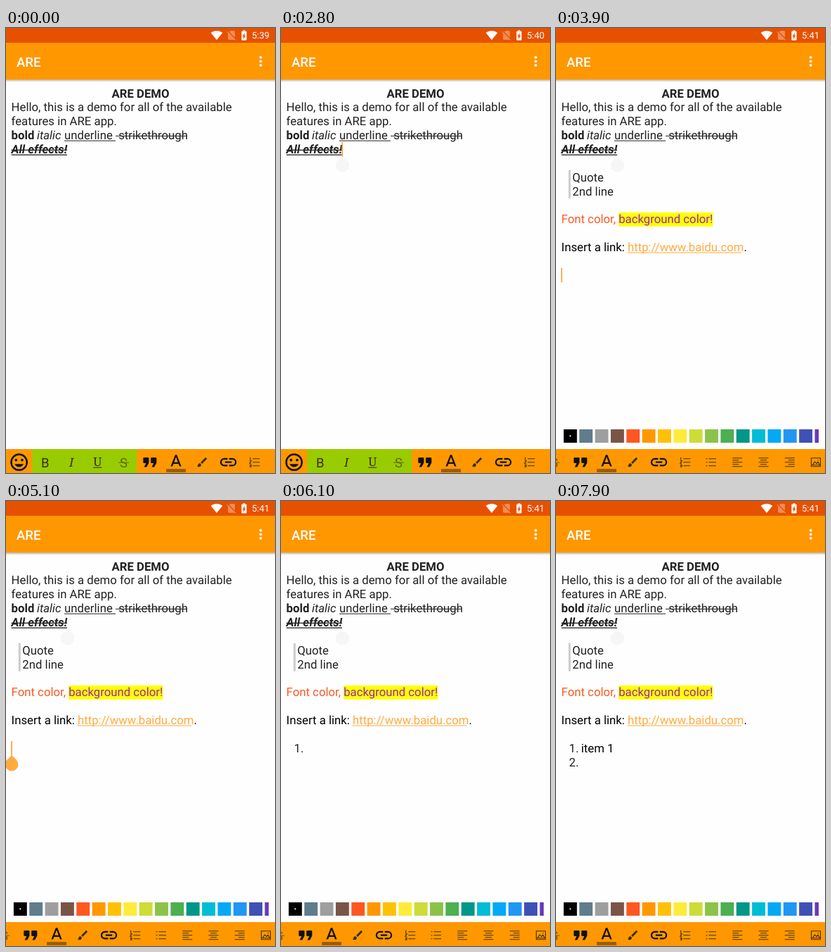
Animation, 383 px wide and 632 px high, one loop 8000 ms. Source, as an HTML page:

```html
<!DOCTYPE html>
<html lang="en">
<head>
<meta charset="utf-8">
<title>Rich text editor demo</title>
<style>
html, body { margin: 0; width: 100%; height: 100%; overflow: hidden; background: #fefefe; }
svg { display: block; width: 383px; height: 632px; }
text { font: 16.76px Roboto, sans-serif; fill: #212121; white-space: pre; text-rendering: geometricPrecision; }
.bold { font-weight: 700; }
.italic { font-style: italic; }
.black { fill: #000; }
.link { fill: #ffab40; }
.title { font-size: 18.6px; font-weight: 500; fill: #fff; }
.clock { font-size: 13px; fill: #fff; }
.icon-text { font-size: 18.5px; fill: #3a2c12; text-anchor: middle; }
.serif { font-family: "Noto Serif", serif; font-size: 17px; }
.thin { fill: none; stroke: #40300f; stroke-width: 1.1; }
</style>
</head>
<body>
<svg viewBox="0 0 383 632">
  <defs>
    <linearGradient id="shade" x2="0" y2="1">
      <stop stop-color="#000" stop-opacity=".28"/>
      <stop offset="1" stop-color="#000" stop-opacity="0"/>
    </linearGradient>
    <clipPath id="paletteClip"><rect x="9" y="565" width="365" height="30"/></clipPath>
    <path id="drop" d="M0-13.1L6.6-6.6A9.3 9.3 0 1 1-6.6-6.6Z" fill="#ffab40"/>
  </defs>
  <rect width="383" height="632" fill="#fefefe"/>

  <rect y="73" width="383" height="4" fill="url(#shade)"/>
  <rect y="20" width="383" height="53.3" fill="#ff9800"/>
  <rect width="383" height="21" fill="#e65100"/>
  <g fill="#fff">
    <path transform="translate(291.6 2) scale(.7)" d="M12 21.5L23.64 7C23.2 6.66 18.7 3 12 3S.8 6.66.36 7Z"/>
    <path transform="translate(312.6 2) scale(.7)" opacity=".35" d="M19 5c0-1.1-.9-2-2-2h-7L7.66 5.34 19 16.68ZM3.65 3.88L2.38 5.15 5 7.77V19c0 1.1.9 2 2 2h10c.35 0 .67-.1.96-.26l1.88 1.88 1.27-1.27Z"/>
    <path transform="translate(330.3 1.7) scale(.72)" d="M15.67 4H14V2h-4v2H8.33C7.6 4 7 4.6 7 5.33v15.33C7 21.4 7.6 22 8.33 22h7.33c.74 0 1.34-.6 1.34-1.33V5.33C17 4.6 16.4 4 15.67 4ZM11 20v-5.5H9L13 7v5.5h2Z"/>
    <circle cx="362.6" cy="41.7" r="1.9"/>
    <circle cx="362.6" cy="47.3" r="1.9"/>
    <circle cx="362.6" cy="52.9" r="1.9"/>
  </g>
  <text id="clock" class="clock" x="350" y="15.2"></text>
  <text class="title" x="15" y="54.6">ARE</text>

  <g id="page"></g>
  <g id="quoteBlock"></g>
  <g id="linkBlock"></g>
  <g id="list"></g>
  <circle id="ghost" cx="87.5" cy="195" r="9.8" fill="#f6f6f6"/>
  <use id="handle" href="#drop"/>
  <rect id="cursor" width="1.7" height="20.2" fill="#ffa330"/>

  <g clip-path="url(#paletteClip)"><g id="palette"></g></g>

  <rect y="598" width="383" height="34" fill="#ff9800"/>
  <g id="tools">
    <rect id="active" y="598" height="34" fill="#9c0"/>
    <g id="icons"></g>
  </g>
</svg>
<script>
const LOOP = 8000, LINE = 19.86, LEFT = 7.6, SLOT = 37.24;
const byId = id => document.getElementById(id);
const baseline = line => 98.6 + LINE * line;
const put = (id, markup) => { byId(id).innerHTML = markup; };
const set = (id, attrs) => {
  for (const name in attrs) byId(id).setAttribute(name, attrs[name]);
};
const show = (id, on) => { byId(id).style.display = on ? '' : 'none'; };

const words = (x, line, text, cls = '', extra = '') =>
  `<text x="${x}" y="${baseline(line)}" class="${cls}" ${extra}>${text}</text>`;
const rule = (x1, x2, line, dy, color = '#212121', height = 1) =>
  `<rect x="${x1}" y="${baseline(line) + dy}" width="${x2 - x1}" height="${height}" fill="${color}"/>`;
const UNDER = 1.5, STRIKE = -5.3;

put('page', [
  words(191.5, 0, 'ARE DEMO', 'bold', 'text-anchor="middle"'),
  words(LEFT, 1, 'Hello, this is a demo for all of the available'),
  words(LEFT, 2, 'features in ARE app.'),
  words(LEFT, 3, 'bold', 'bold'),
  words(44, 3, 'italic', 'italic'),
  words(83, 3, 'underline'), rule(83, 156, 3, UNDER),
  words(160.2, 3, 'strikethrough'), rule(156, 258, 3, STRIKE),
  words(LEFT, 4, 'All effects!', 'bold italic'),
  rule(LEFT, 87, 4, UNDER, '#212121', 1.3), rule(LEFT, 87, 4, STRIKE, '#212121', 1.3)
].join(''));

put('quoteBlock', [
  '<rect x="17.8" y="202" width="3" height="39.8" fill="#ccc"/>',
  words(23.3, 6, 'Quote'), words(23.3, 7, '2nd line'),
  '<rect x="89.2" y="262" width="134.2" height="19.8" fill="#ff0"/>',
  words(LEFT, 9, 'Font color,', '', 'style="fill:#ff5722"'),
  words(89.2, 9, 'background color!', '', 'style="fill:#9c27b0"')
].join(''));

put('linkBlock',
  words(LEFT, 11, 'Insert a link: <tspan class="link">http://www.baidu.com</tspan>.', 'black') +
  rule(101.3, 264.3, 11, UNDER, '#ffab40'));

const swatches = ('000 607d8b 9e9e9e 795548 ff5722 ff9800 ffc107 ffeb3b cddc39 8bc34a ' +
  '4caf50 009688 00bcd4 03a9f4 2196f3 3f51b5 673ab7 9c27b0 e91e63 f44336').split(' ');
const swatchX = i => 10.9 + 22.35 * i;
put('palette', swatches.map((color, i) =>
  `<rect x="${swatchX(i)}" y="570" width="18.9" height="19" fill="#${color}"/>`).join('') +
  '<circle id="picked" cy="579.3" r="1.1" fill="#fff"/>');

// Toolbar icons, each drawn around its own centre.
const glyph = (scale, d, fill = '#111') =>
  `<path transform="scale(${scale}) translate(-12 -12)" fill="${fill}" d="${d}"/>`;
const thin = d => `<path class="thin" d="${d}"/>`;
const letter = (char, cls = '', y = 7) => `<text class="icon-text ${cls}" y="${y}">${char}</text>`;
const rows = place => [-6, -3, 0, 3, 6].map((y, i) => {
  const width = i % 2 ? 9 : 14;
  return `M${-7 + place * (14 - width)} ${y}h${width}`;
}).join('');

const icons = [
  glyph(1.24, 'M12 2a10 10 0 1 0 0 20a10 10 0 1 0 0-20ZM12 20a8 8 0 1 1 0-16a8 8 0 1 1 0 16ZM15.5 11a1.5 1.5 0 1 0 0-3a1.5 1.5 0 1 0 0 3ZM8.5 11a1.5 1.5 0 1 0 0-3a1.5 1.5 0 1 0 0 3ZM12 17.5c2.33 0 4.31-1.46 5.11-3.5H6.89c.8 2.04 2.78 3.5 5.11 3.5Z'),
  letter('B'),
  letter('I', 'serif italic', 6.6),
  letter('U', 'serif', 5) + thin('M-6 7.5h12'),
  `<g opacity=".6">${letter('S')}${thin('M-7.5 .5h15')}</g>`,
  glyph(1.36, 'M6 17h2.6l2.4-4.500V8q0-1-1-1H6Q5 7 5 8v4q0 1 1 1h2ZM14 17h2.600l2.400-4.500V8q0-1-1-1h-4q-1 0-1 1v4q0 1 1 1h2Z'),
  glyph(1.166, 'M11 3L5.500 17h2.250l1.120-3h6.250l1.120 3h2.250L13 3ZM9.620 12L12 5.670 14.380 12Z') +
    '<rect x="-14" y="9.500" width="28" height="4.700" fill="#000" opacity=".4"/>',
  glyph(.74, 'M7 14c-1.660 0-3 1.340-3 3 0 1.310-1.160 2-2 2 .92 1.220 2.490 2 4 2 2.210 0 4-1.790 4-4 0-1.660-1.340-3-3-3Zm13.710-9.370l-1.340-1.340c-.39-.39-1.020-.39-1.410 0L9 12.250 11.750 15l8.960-8.960c.39-.39.39-1.020 0-1.410Z', '#3a2c12'),
  glyph(1.17, 'M3.900 12c0-1.710 1.390-3.100 3.100-3.100h4V7H7a5 5 0 0 0 0 10h4v-1.900H7c-1.710 0-3.100-1.390-3.100-3.100ZM8 13h8v-2H8ZM17 7h-4v1.900h4a3.100 3.100 0 0 1 0 6.200h-4V17h4a5 5 0 0 0 0-10Z'),
  thin('M-2.500-5h10M-2.500 0h10M-2.500 5h10M-6-7v4M-7-2h2.500L-7 1.500h2.500M-7 3.500h2.300v3H-7M-7 5h2'),
  thin('M-3.500-5h10.500M-3.500 0h10.500M-3.500 5h10.500M-7.500-5h2M-7.500 0h2M-7.500 5h2'),
  thin(rows(0)), thin(rows(.5)), thin(rows(1)),
  thin('M-6.500-6h13v12h-13ZM-5 4L-1.500-.5 1 2 3-.5 5.500 4ZM2.500-3h1.500')
];
put('icons', icons.map((icon, i) =>
  `<g transform="translate(${SLOT * (i + .5)} 616.700)">${icon}</g>`).join(''));

// Editor scenes: toolbar scroll, highlighted slots, palette scroll and picked swatch.
const scenes = [
  { scroll: 0, slot: 1, slots: 4 },
  { scroll: 0, slot: 7, slots: 1, palette: -82.3, pick: 17 },
  { scroll: -170, slot: 0, slots: 0, palette: 0, pick: 0 }
];

// Caret position as [x, line]; handle as [x, line, opacity].
const EFFECTS = [86.4, 4], COLOR = [222.7, 9], START = [7.2, 13];
const caret = (x, line = 13) => ({ cursor: [x, line] });
const OFF = { cursor: null };
const handleAt = ([x, line], opacity) => ({ handle: [x + .9, line, opacity] });
const type = (text, x) => ({ items: [text], cursor: [x, 13] });

const steps = [
  [0, { clock: '5:39', scene: 0, cursor: null, handle: null, ghost: false, items: [] }],
  [300, { cursor: EFFECTS }], [800, OFF], [1200, { cursor: EFFECTS }], [1500, OFF],
  [1900, { cursor: EFFECTS }],
  [2000, handleAt(EFFECTS, 1)], [2100, handleAt(EFFECTS, .5)],
  [2200, { handle: null, ghost: true }],
  [2400, OFF], [2700, { cursor: EFFECTS }], [2800, { clock: '5:40' }], [3000, OFF],
  [3200, { clock: '5:41', scene: 1 }],
  [3300, { cursor: COLOR }], [3700, OFF],
  [3900, { scene: 2, cursor: START }], [4300, OFF], [4700, { cursor: START }],
  [5000, handleAt(START, .6)], [5100, handleAt(START, 1)],
  [5300, OFF], [5400, { cursor: START }], [5500, handleAt(START, .95)],
  [5600, handleAt(START, .88)], [5700, handleAt(START, .5)],
  [5800, { ...handleAt(START, .15), ...type('', 35.4) }],
  [6000, { handle: null }], [6100, OFF], [6400, caret(35.4)],
  [6600, type('i', 39.6)], [6700, type('it', 45)], [6800, type('ite', 53.6)],
  [6900, type('item', 68.3)], [7200, OFF],
  [7300, type('item ', 72.4)], [7400, type('item 1', 81.6)],
  [7600, { items: ['item 1', ''], cursor: [35.4, 14] }], [7900, OFF]
];

function render(state) {
  const scene = scenes[state.scene];
  byId('clock').textContent = state.clock;
  show('quoteBlock', state.scene > 0);
  show('linkBlock', state.scene > 1);
  show('ghost', state.ghost);
  put('list', state.items.map((item, i) =>
    words(18.6, 13 + i, `${i + 1}.`) + words(35.8, 13 + i, item, 'black')).join(''));

  show('cursor', state.cursor);
  if (state.cursor) {
    const [x, line] = state.cursor;
    set('cursor', { x, y: baseline(line) - 15.8 });
  }
  show('handle', state.handle);
  if (state.handle) {
    const [x, line, opacity] = state.handle;
    set('handle', { x, y: baseline(line) + 17.4, opacity });
  }

  set('tools', { transform: `translate(${scene.scroll})` });
  set('active', { x: SLOT * scene.slot, width: SLOT * scene.slots });
  show('palette', 'palette' in scene);
  if ('palette' in scene) {
    set('palette', { transform: `translate(${scene.palette})` });
    set('picked', { cx: swatchX(scene.pick) + 9.4 });
  }
}

const start = performance.now();
let shown = -1;
function tick() {
  const time = (performance.now() - start) % LOOP;
  const count = steps.filter(([at]) => at <= time).length;
  if (count !== shown) {
    shown = count;
    render(Object.assign({}, ...steps.slice(0, count).map(([, change]) => change)));
  }
  requestAnimationFrame(tick);
}
tick();
</script>
</body>
</html>
```
